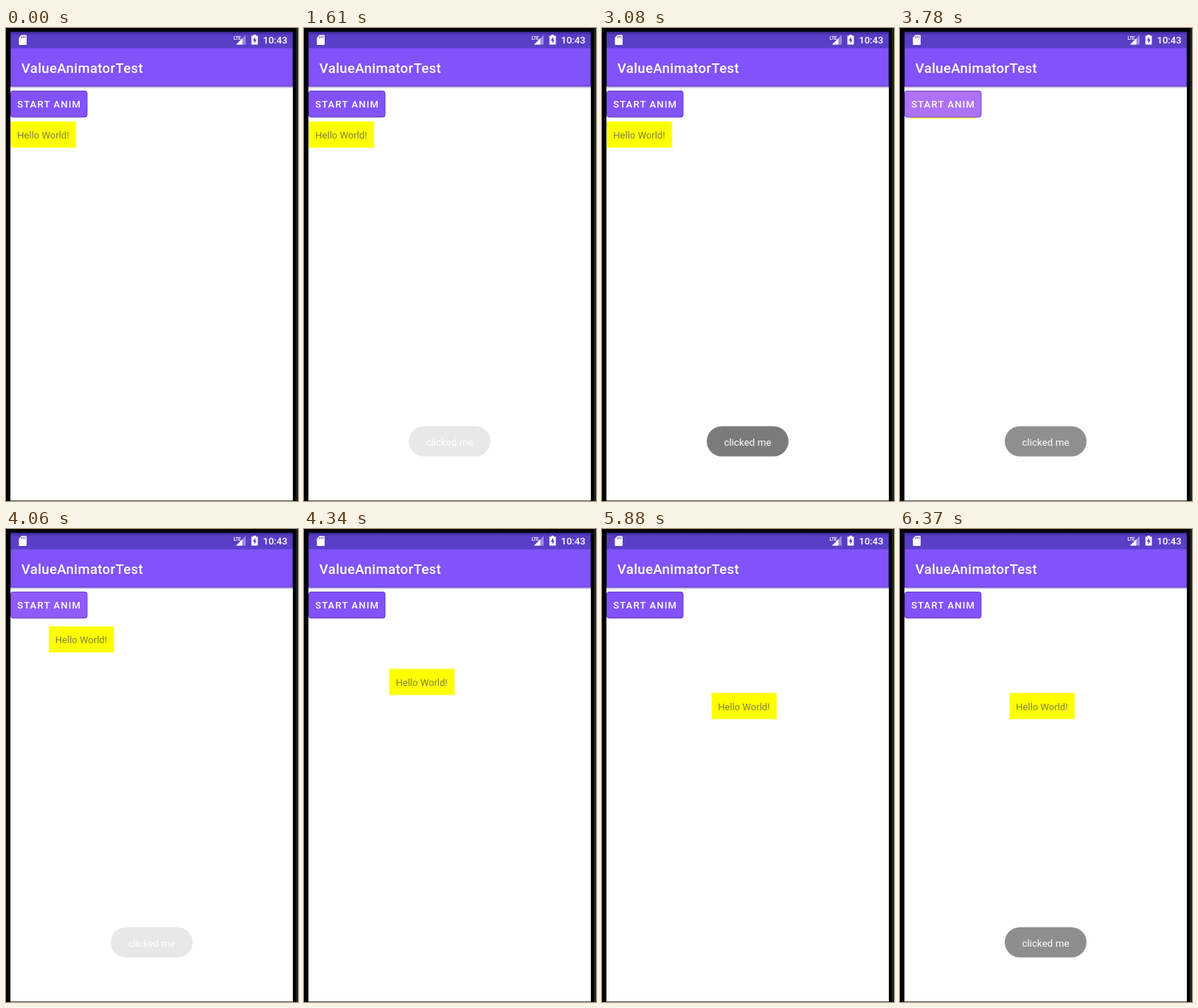
An HTML page that plays this animation: 396 px wide and 642 px high, repeating every 6.44 s.

```html
<!DOCTYPE html>
<html lang="en">
<head>
<meta charset="utf-8">
<title>Value animator demo</title>
<style>
  html, body { margin: 0; width: 100%; height: 100%; overflow: hidden; background: #000; }
  svg { display: block; width: 396px; height: 642px; }
  text { font-family: Roboto, "Noto Sans", sans-serif; fill: #fff; font-size: 13.03px; }
  .medium { font-weight: 500; }
</style>
</head>
<body>
<svg viewBox="0 0 396 642">
  <defs>
    <linearGradient id="barShadow" x2="0" y2="1">
      <stop offset="0" stop-color="#8a70d0" stop-opacity=".7"/>
      <stop offset="1" stop-color="#aaa" stop-opacity="0"/>
    </linearGradient>
    <linearGradient id="statusFill" x2="0" y2="1">
      <stop offset="0" stop-color="#35258a"/>
      <stop offset=".2" stop-color="#593dc6"/>
      <stop offset="1" stop-color="#5b3fc8"/>
    </linearGradient>
    <clipPath id="buttonClip"><rect x="6" y="85" width="104.5" height="36.5" rx="4"/></clipPath>
  </defs>

  <rect width="396" height="642" fill="#000"/>
  <rect x="393" width="3" height="642" fill="#1c2222"/>
  <rect x="6" y="5" width="383" height="637" fill="#fff"/>

  <g id="label">
    <rect x=".5" y=".5" width="88.5" height="35.5" fill="#ff0" stroke="#ffff8c"/>
    <text x="9.3" y="23.6" style="fill:#80803a">Hello World!</text>
  </g>

  <g clip-path="url(#buttonClip)">
    <rect x="6" y="85" width="104.5" height="36.5" fill="#8252fb"/>
    <circle id="ripple" cx="58" cy="103" fill="#dc96f5"/>
  </g>
  <rect x="6.5" y="85.500" width="103.5" height="35.5" rx="3.5" fill="none" stroke="#4a2a98" stroke-opacity=".55"/>
  <text class="medium" x="15.3" y="108" letter-spacing="1.16">START ANIM</text>

  <rect x="6" y="79.5" width="383" height="3" fill="url(#barShadow)"/>
  <rect x="6" y="27" width="383" height="52.5" fill="#8252fb"/>
  <rect x="6" y="5" width="383" height="22.5" fill="url(#statusFill)"/>
  <path d="M6.500 5V79H388.500V5" fill="none" stroke="#2c1a70" stroke-opacity=".4"/>
  <text class="medium" x="20.800" y="60.500" style="font-size:18.6px" letter-spacing=".35">ValueAnimatorTest</text>

  <path d="M21 9.5H27Q28 9.5 28 10.5V22Q28 23 27 23H18.500Q17.500 23 17.500 22V13Z" fill="#fff"/>
  <path d="M21.500 11V13.500M23.700 11V13.500M25.900 11V13.500" stroke="#593dc6"/>
  <path d="M325 9.500V22.500H312Z" fill="#fff" opacity=".4"/>
  <path d="M320.500 14V22.500H312Z" fill="#fff"/>
  <text class="medium" x="308.500" y="16" style="font-size:7px" letter-spacing="-.6">LTE</text>
  <path d="M335.500 9H338.700V10.500H341.500V22.500H332.800V10.500H335.500Z" fill="#fff"/>
  <path d="M338 12L334.700 17H336.700V21L339.800 15.800H338Z" fill="#593dc6"/>
  <text class="medium" x="348.500" y="21">10:43</text>

  <g id="toast">
    <rect x="142" y="540.500" width="111" height="41" rx="20.500" fill="#7b7b7b"/>
    <text x="197.500" y="566.500" text-anchor="middle" style="font-size:13.4px">clicked me</text>
  </g>
  <rect x="6" y="641" width="383" height="1" fill="#666"/>
</svg>
<script>
  const LOOP = 6440, STEP = 70;
  const FADE = 535, TOAST_SHOWN = [1563, 6042], TOAST_HIDDEN = 3571;
  const MOVE_START = 3632, MOVE_TIME = 1040, DISTANCE = 142;

  const label = document.getElementById('label');
  const ripple = document.getElementById('ripple');
  const toast = document.getElementById('toast');

  const progress = (t, start, duration) => Math.min(1, Math.max(0, (t - start) / duration));
  const accelerate = p => p * p;
  const decelerate = p => 1 - (1 - p) ** 2;
  const easeInOut = p => (1 - Math.cos(Math.PI * p)) / 2;

  function toastOpacity(t) {
    if (t >= TOAST_SHOWN[1]) return decelerate(progress(t, TOAST_SHOWN[1], FADE));
    if (t >= TOAST_HIDDEN) return 1 - accelerate(progress(t, TOAST_HIDDEN, FADE));
    return decelerate(progress(t, TOAST_SHOWN[0], FADE));
  }

  function labelPosition(t) {
    if (t < MOVE_START) return [6, 126.5];
    const offset = DISTANCE * easeInOut(progress(t, MOVE_START, MOVE_TIME));
    return [6 + offset, 80 + offset];
  }

  function render(t) {
    label.setAttribute('transform', `translate(${labelPosition(t)})`);
    toast.setAttribute('opacity', toastOpacity(t));
    ripple.setAttribute('r', 62 * decelerate(progress(t, 3100, 420)));
    ripple.setAttribute('opacity', 0.5 * (1 - progress(t, 3760, 420)));
  }

  const origin = performance.now();
  function tick() {
    const t = (performance.now() - origin) % LOOP;
    render(Math.floor(t / STEP) * STEP);
    requestAnimationFrame(tick);
  }
  render(0);
  requestAnimationFrame(tick);
</script>
</body>
</html>
```
